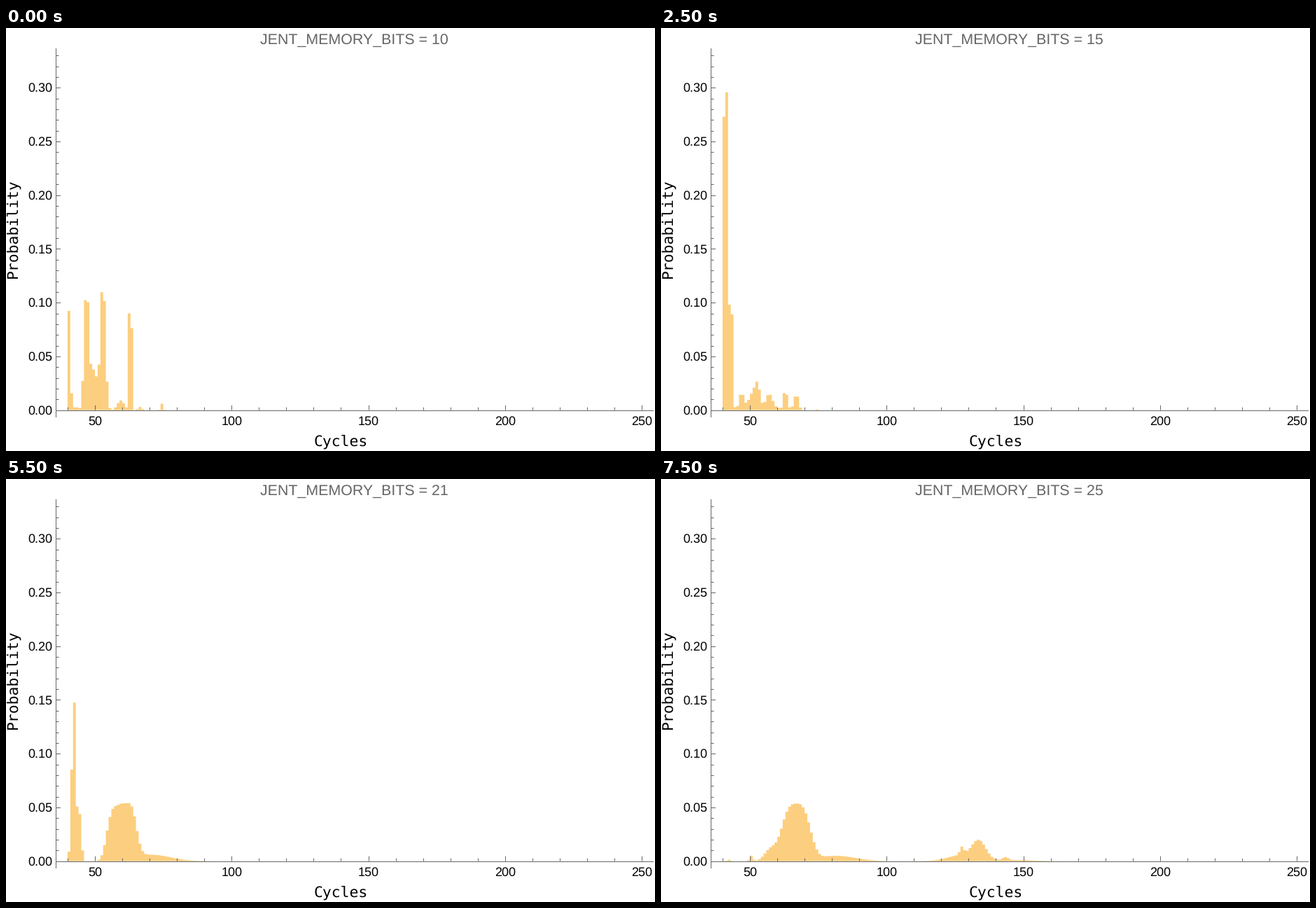
Write a matplotlib script that moves like this. It is 927x604 px and loops after 8000 ms.

```python
import matplotlib.pyplot as plt
import numpy as np
from matplotlib.animation import FuncAnimation

plt.rcParams["text.hinting"] = "none"

W, H, DPI = 927, 604, 64
PX = 72 / DPI  # points per pixel
X0, XSTEP = 127 - 50 * 3.905, 3.905
Y0, YSTEP = 545.7, 1535
CYCLES = np.arange(40, 170)
GREY, BAR = "#666666", "#fcce7f"


def xpos(cycles):
    return X0 + XSTEP * cycles


def ypos(prob):
    return Y0 - YSTEP * prob


def bump(mid, width, height, power=2):
    return height * np.exp(-np.abs((CYCLES - mid) / width) ** power)


def probabilities(bits):
    """Latency distribution as a sum of bumps that drift with memory size."""
    def ramp(*points):
        return np.interp(bits, *zip(*points))

    # fastest accesses: a sharp peak at 40 cycles that slides to 42
    mid = ramp((10, 40), (13, 40.35), (15, 40.52), (19, 41.5), (21, 41.82))
    width = ramp((15, 0.75), (17, 1.25), (19, 1.4), (21, 1.08), (23, 0.8))
    mass = ramp((10, 108), (13, 290), (15, 575), (19, 745), (21, 290),
                (23, 51), (25, 2))
    peak = bump(mid, width, 1)
    p = mass * peak / peak.sum()
    p += bump(ramp((15, 42.5), (19, 44), (21, 44.1)), 0.75,
              ramp((10, 4), (13, 42), (15, 139), (19, 80), (21, 42),
                   (23, 9), (25, 0)))

    # lobes of small memories
    small = ramp((10, 1), (13, 0.7), (15, 0.14), (17, 0))
    p += small * (bump(46.45, 1.2, 117) + bump(49.2, 1.6, 37)
                  + bump(52.45, 1.25, 123) + bump(62.48, 0.5, 225)
                  + bump(59, 1.8, 9) + bump(66, 1, 3) + bump(74, 0.6, 6))

    # low echoes that follow the fast peak
    echo = ramp((10, 0), (13, 10), (15, 15), (19, 16), (21, 0))
    for offset, spread in (10.5, 1.8), (16, 1.8), (26, 1.1):
        p += bump(mid + offset, spread, echo)
    p += bump(62.7, 2, echo / 4)

    # broad hump of large memories, its shoulder and tail
    p += bump(ramp((21, 57.5), (23, 58.5), (25, 66.3)),
              ramp((21, 4.2), (23, 3.2), (25, 6.2)),
              ramp((19, 0), (21, 50), (23, 95), (25, 53)), 3)
    p += bump(ramp((21, 63), (23, 66)), ramp((21, 2.6), (23, 3.5)),
              ramp((19, 0), (21, 42), (23, 31), (25, 0)))
    p += bump(ramp((21, 70), (23, 75), (25, 81)), 10,
              ramp((19, 0), (21, 6), (25, 5)))

    # main-memory accesses
    far = ramp((23, 0), (25, 1))
    p += far * (bump(57, 3, 11) + bump(50, 0.8, 5) + bump(128, 8, 6)
                + bump(127, 1, 7) + bump(133.3, 3.5, 16)
                + bump(143, 1.5, 3) + bump(148, 8, 1))
    return p / 1000


fig = plt.figure(figsize=(W / DPI, H / DPI), dpi=DPI, facecolor="white")
ax = fig.add_axes([0, 0, 1, 1])
ax.set_xlim(0, W)
ax.set_ylim(H, 0)
ax.axis("off")


def label(x, y, s, size, font="Liberation Sans", color="black", **kw):
    kw = {"ha": "center", "va": "baseline", **kw}
    return ax.text(x, y, s, fontsize=size * PX, family=font, color=color, **kw)


def rule(draw, at, start, end):
    """One-pixel line on the centre of its pixel row or column."""
    draw(round(at) + 0.5, start, end, colors=GREY, lw=PX, snap=False, zorder=3)


bars = ax.stairs(np.full(len(CYCLES), Y0),
                 xpos(np.arange(CYCLES[0], CYCLES[-1] + 2)),
                 baseline=Y0, fill=True, color=BAR, snap=False, zorder=1)

rule(ax.hlines, Y0, 71, 925)
rule(ax.vlines, 71, 29, 556)
for c in range(40, 251, 10):
    major = c % 50 == 0
    rule(ax.vlines, xpos(c), Y0 - (7 if major else 4), Y0)
    if major:
        label(xpos(c), 567, str(c), 18)
for k in range(34):
    major = k % 5 == 0
    y = ypos(k / 100)
    rule(ax.hlines, y, 71, 78 if major else 75.5)
    if major:
        label(66.5, y + 6, f"{k / 100:.2f}", 18, ha="right")

label(478, 596.5, "Cycles", 21.33, "DejaVu Sans Mono")
label(16, 286.5, "Probability", 21.33, "DejaVu Sans Mono",
      rotation=90, rotation_mode="anchor")
title = label(497.8, 22.5, "", 21.33, color=GREY)


def update(i):
    bits = 10 + i
    title.set_text(f"JENT_MEMORY_BITS = {bits}")
    bars.set_data(values=ypos(probabilities(bits)))
    return bars, title


anim = FuncAnimation(fig, update, frames=16, interval=500, repeat=True)
plt.show()
```
